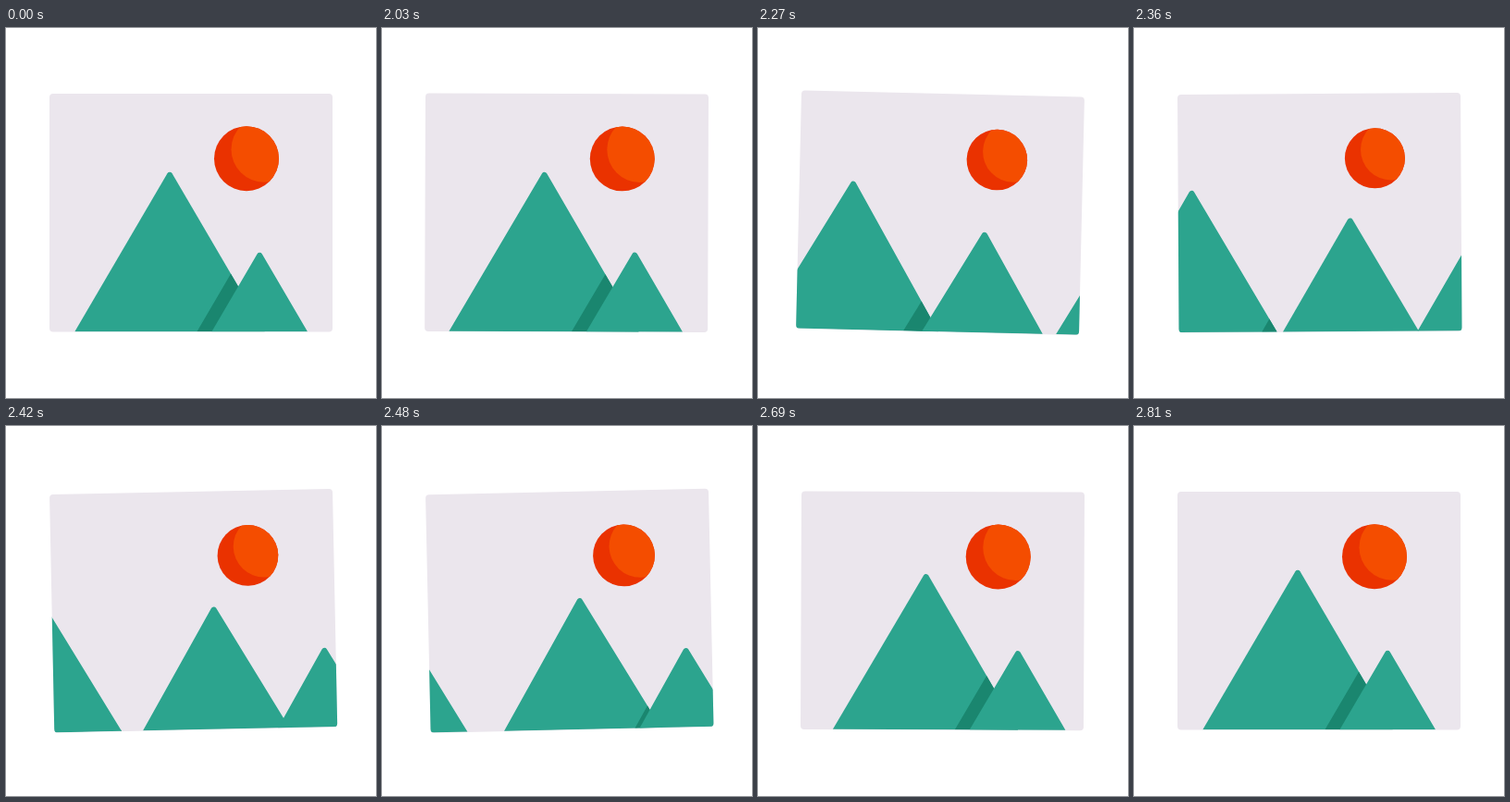
An HTML page with a canvas for the animation above (2840 ms loop, 400x400 px).

```html
<!DOCTYPE html>
<html>
<head>
<meta charset="utf-8">
<style>
  html, body { margin: 0; height: 100%; overflow: hidden; background: #fff; }
  canvas { display: block; }
</style>
</head>
<body>
<canvas id="stage" width="400" height="400"></canvas>
<script>
const ctx = document.getElementById('stage').getContext('2d');
const LOOP = 2840, START = 2030, STEP = 30;
const BASE = 328.2, SLOPE = 0.585, TIP = 3;
const GREEN = '#2ca48e', SHADE = '#1a866f';

const mix = (a, b, p) => a + (b - a) * p;
const clamp = u => Math.min(1, Math.max(0, u));
const smooth = (t, from, to) => {
  const u = clamp((t - from) / (to - from));
  return u * u * (3 - 2 * u);
};
const wave = (t, from, to) => (1 - Math.cos(Math.PI * clamp((t - from) / (to - from)))) / 2;

// Degrees of swing about the middle of the card's top edge.
const swing = t =>
  2 * wave(t, 1990, 2190) - 3.35 * wave(t, 2190, 2460) +
  1.82 * wave(t, 2460, 2585) - 0.47 * wave(t, 2585, 2790);

function mountain({ x, h }) {
  const half = h * SLOPE;
  const path = new Path2D();
  path.moveTo(x - half, BASE);
  path.arcTo(x, BASE - h, x + half, BASE, TIP);
  path.lineTo(x + half, BASE);
  path.closePath();
  return path;
}

function fill(path, color) {
  ctx.fillStyle = color;
  ctx.fill(path);
}

function disc(x, y, r) {
  const path = new Path2D();
  path.arc(x, y, r, 0, 2 * Math.PI);
  return path;
}

function inside(path, draw) {
  ctx.save();
  ctx.clip(path);
  draw();
  ctx.restore();
}

// Shadow that one peak throws on the peak behind it.
function shadow(back, front, offset) {
  if (offset <= 0) return;
  inside(mountain(back), () =>
    fill(mountain({ x: front.x - offset, h: front.h }), SHADE));
}

function drawSun(t) {
  const scale = 1 - 0.0714 * (smooth(t, 2000, 2340) - smooth(t, 2340, 2680));
  ctx.save();
  ctx.translate(260, 141.2);
  ctx.scale(scale, scale);
  const sun = disc(0, 0, 35);
  fill(sun, '#ea3200');
  inside(sun, () => fill(disc(19, -10, 35.5), '#f44d00'));
  ctx.restore();
}

function drawPeaks(t) {
  const p = smooth(t, 2000, 2800);
  const leaving = { x: mix(177, -94, p), h: mix(175.5, 130, p) };
  const growing = { x: mix(274.2, 177, p), h: mix(88.5, 175.5, p) };
  const coming = { x: mix(418, 274.2, p), h: 88.5 };
  fill(mountain(leaving), GREEN);
  shadow(leaving, growing, 16 * growing.h / 88.5);
  fill(mountain(growing), GREEN);
  shadow(growing, coming, 16 * clamp((p - 0.54) * 3));
  fill(mountain(coming), GREEN);
}

function draw(t) {
  ctx.clearRect(0, 0, 400, 400);
  ctx.save();
  ctx.translate(200, 71);
  ctx.rotate(swing(t) * Math.PI / 180);
  ctx.translate(-200, -71);
  const card = new Path2D();
  card.roundRect(47, 71, 306, 257.6, 4);
  fill(card, '#ebe6ed');
  inside(card, () => {
    drawSun(t);
    drawPeaks(t);
  });
  ctx.restore();
}

function tick() {
  const t = performance.now() % LOOP;
  // The card rests first, then moves in even steps.
  draw(t < START ? 0 : START + Math.floor((t - START) / STEP) * STEP);
  requestAnimationFrame(tick);
}
tick();
</script>
</body>
</html>
```
